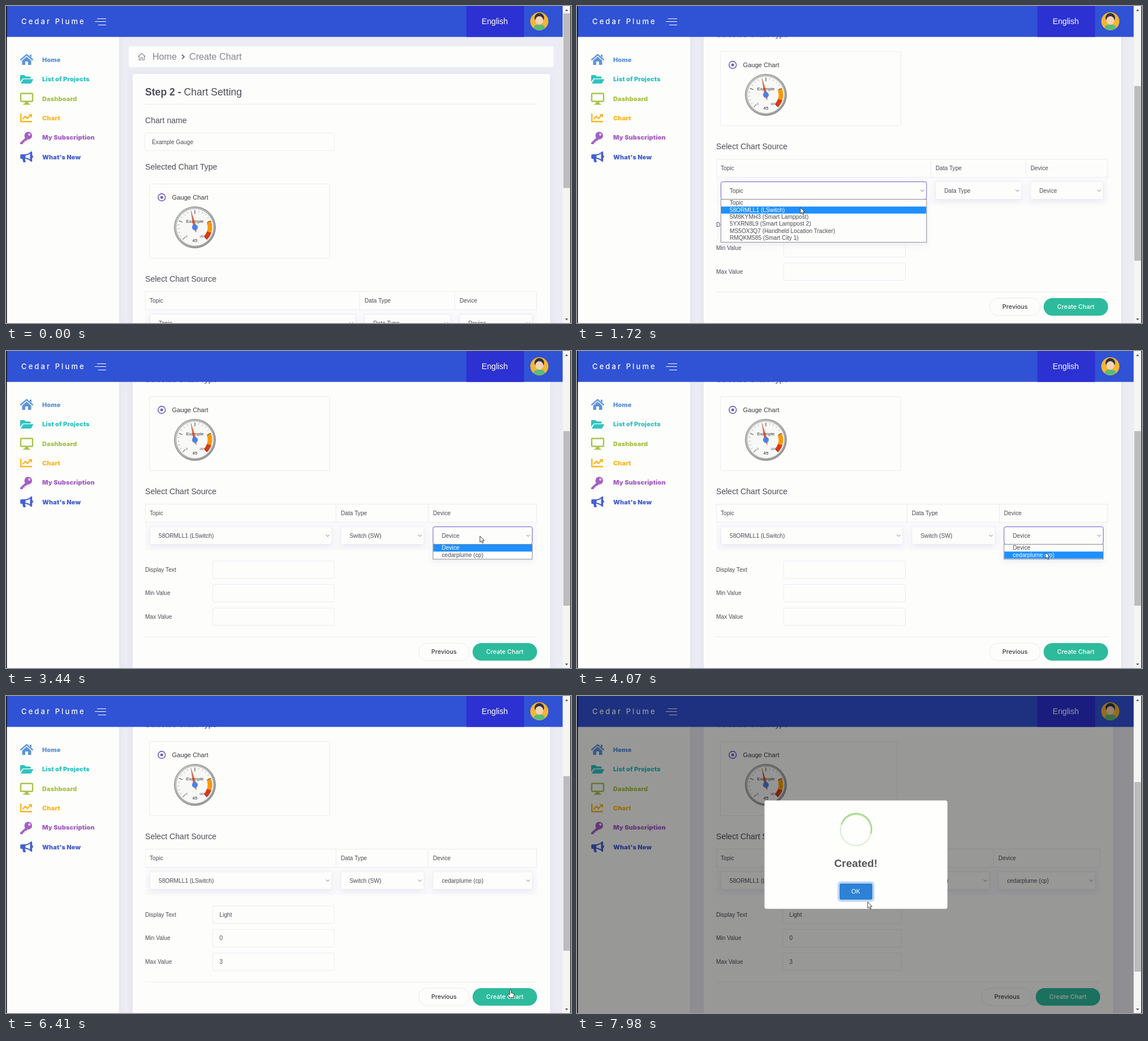
Recreate the animation shown at these times as an HTML page. Size 999 px wide and 560 px high, loop 8 s.

```html
<!DOCTYPE html>
<html lang="en">
<head>
<meta charset="utf-8">
<title>Create Chart</title>
<style>
html, body { margin: 0; width: 100%; height: 100%; overflow: hidden; background: #ececf4; }
svg { display: block; font-family: Arial, "Liberation Sans", sans-serif; }
.ui { font-family: Inter, Roboto, sans-serif; }
</style>
</head>
<body>
<svg id="stage" width="999" height="560" viewBox="0 0 999 560">
  <defs>
    <filter id="soft" x="-20%" y="-60%" width="140%" height="260%">
      <feDropShadow dx="0" dy="4" stdDeviation="5" flood-color="#6a6ac8" flood-opacity=".11"/>
    </filter>
    <filter id="card" x="-10%" y="-10%" width="120%" height="120%">
      <feDropShadow dx="0" dy="0" stdDeviation="6" flood-color="#6a6ac8" flood-opacity=".1"/>
    </filter>
    <linearGradient id="rim" x2="1" y2="1">
      <stop stop-color="#c9c9c9"/><stop offset="1" stop-color="#929292"/>
    </linearGradient>
  </defs>
  <g id="page"></g>
  <g id="frame"></g>
  <g id="top"></g>
</svg>
<script>
const STEP = 156.3, LOOP = 8000;
const INK = '#4d4d57', LINE = '#ebebf5', PAPER = '#fdfdfb', PURPLE = '#6c5fc4', BLUE = '#1e90ff';
const $ = id => document.getElementById(id);
const clamp = v => Math.max(0, Math.min(1, v));
const ease = v => v * v * (3 - 2 * v);

const rect = (x, y, r, b, fill, more = '') =>
  `<rect x="${x}" y="${y}" width="${r - x}" height="${b - y}" fill="${fill}" ${more}/>`;
const box = (x, y, r, b, stroke = LINE, rx = 3, more = '') =>
  rect(x, y, r, b, PAPER, `stroke="${stroke}" rx="${rx}" ${more}`);
const text = (x, y, s, size = 10.2, fill = INK, more = '') =>
  `<text x="${x}" y="${y}" font-size="${size}" fill="${fill}" ${more}>${s}</text>`;
const path = (d, stroke, width = 1, fill = 'none', more = '') =>
  `<path d="${d}" stroke="${stroke}" stroke-width="${width}" fill="${fill}" ${more}/>`;
const disc = (x, y, r, fill, more = '') => `<circle cx="${x}" cy="${y}" r="${r}" fill="${fill}" ${more}/>`;
const polar = (r, deg) => {
  const a = deg * Math.PI / 180;
  return `${(r * Math.cos(a)).toFixed(2)} ${(r * Math.sin(a)).toFixed(2)}`;
};
const MID = 'text-anchor="middle"';

// Cursor stops: step, x, y
const stops = [[5, 640, 230], [8, 430, 325], [9, 428, 328], [11, 395, 356], [13, 397, 357], [15, 690, 327],
  [17, 681, 356], [20, 684, 358], [22, 838, 327], [24, 829, 355], [27, 828, 356], [29, 470, 386],
  [34, 470, 388], [38, 475, 470], [40, 885, 521], [41, 892, 519], [44, 905, 527], [48, 918, 530], [49, 900, 518], [51, 514, 364]];

function cursorAt(k) {
  let i = 1;
  while (i < stops.length - 1 && stops[i][0] < k) i++;
  const [p, q] = [stops[i - 1], stops[i]];
  const f = ease(clamp((k - p[0]) / (q[0] - p[0])));
  return [p[1] + (q[1] - p[1]) * f, p[2] + (q[2] - p[2]) * f];
}

function gauge() {
  const at = v => 135 + 2.7 * v;
  const arc = (from, to, color) =>
    path(`M${polar(26.5, at(from))}A26.5 26.5 0 0 1 ${polar(26.5, at(to))}`, color, 8);
  let s = disc(0, 0, 36.5, 'url(#rim)', 'stroke="#777" stroke-width=".8"') +
    disc(0, 0, 32.5, '#f8f8f7', 'stroke="#ddd"') + arc(75, 90, '#ff9900') + arc(90, 100, '#dc3912');
  for (let v = 0; v <= 100; v += 5) {
    const major = v % 25 === 0;
    s += path(`M${polar(major ? 24 : 27.5, at(v))}L${polar(30.5, at(v))}`, major ? '#333' : '#777', major ? 1 : .6);
  }
  s += text(0, -8, 'Example', 8, '#333', MID) + text(0, 26, '45', 8, '#222', MID) +
    text(-14.5, 18, '0', 4.6, '#444', MID) + text(12, 18, '100', 4.6, '#444', MID);
  s += path(`M${polar(29, at(45))}L${polar(2.6, at(45) + 90)}L${polar(9, at(45) + 180)}L${polar(2.6, at(45) - 90)}Z`,
    '#c63310', .5, '#dc3912', 'opacity=".8"');
  return `<g transform="translate(334 391)">${s}${disc(0, 0, 4.8, '#4684ee', 'stroke="#3a6fd0" stroke-width=".5"')}</g>`;
}

function select(x, r, label, open) {
  return box(x, 544.5, r, 575.5, open ? PURPLE : LINE, 3, open ? '' : 'filter="url(#soft)"') +
    text(x + 15.5, 564, label) + path(`M${r - 10.5} 558.5l3.2 3.2 3.2-3.2`, '#777');
}

function menu(x, r, items, hot) {
  const h = 12.4, y = 575.5;
  return rect(x, y, r, y + items.length * h + 1.5, PAPER, 'stroke="#8c8c94" filter="url(#soft)"') +
    rect(x + .5, y + .4 + hot * h, r - .5, y + .4 + (hot + 1) * h, BLUE) +
    items.map((s, i) => text(x + 15.5, y + 9.7 + i * h, s, 10.2, i === hot ? '#fff' : INK)).join('');
}

function pill(x, r, label, fill, ink, stroke) {
  return rect(x, 750, r, 781, fill, `rx="15.5" stroke="${stroke}"`) +
    text((x + r) / 2, 769.3, label, 10.8, ink, `${MID} class="ui" font-weight="500"`);
}

const topics = ['Topic', '58ORMLL1 (LSwitch)', '5M8KYMH3 (Smart Lamppost)', '5YXRN8L9 (Smart Lamppost 2)',
  'MS5OX3Q7 (Handheld Location Tracker)', 'RMQKM585 (Smart City 1)'];
const types = ['Data Type', 'Switch (SW)'];
const devices = ['Device', 'cedarplume (cp)'];

function page(k, scroll) {
  const done = k >= 49, d = done ? 14 : 0;
  const [a, b] = done ? [577, 737] : k >= 20 ? [584, 747] : k >= 13 ? [618, 798] : [626, 794];
  const edge = 939 - d, inL = done ? 363 : 365, inR = done ? 574 : 580.5;
  let s = box(217, 71, 968 - d, 108, '#f4f4fa', 2) +
    path('M233.5 89.5l6.5-6 6.5 6M235.5 88v7.5h3v-4.5h3v4.5h3V88', '#85858f', 1.1) +
    text(259, 95, 'Home', 16.1, '#85858f') + path('M311 86l4 3.8-4 3.8', '#666670', 1.8) +
    text(324, 95, 'Create Chart', 16.2, '#85858f') +
    rect(224, 120, 962 - d, 830, PAPER, 'filter="url(#card)"') +
    text(246, 158, '<tspan font-weight="bold">Step 2 - </tspan>Chart Setting', 17.6) +
    path(`M246 173.5H${edge}`, LINE) +
    text(246, 207, 'Chart name', 14.1) + box(245.5, 224.5, inR, 255.5) + text(258, 243.7, 'Example Gauge') +
    text(246, 289, 'Selected Chart Type', 14.1) + box(253.5, 314.5, done ? 566 : 572.5, 445.5, LINE, 2) +
    disc(275.3, 338, 6.4, '#fff', `stroke="${PURPLE}" stroke-width="1.6"`) + disc(275.3, 338, 2.5, PURPLE) +
    text(293.5, 341.7, 'Gauge Chart', 11.2, '#3a3a40') + gauge() + text(246, 487, 'Select Chart Source', 14.1);

  s += rect(246, 537, edge, 585, '#fafafb') + box(246.5, 504.5, edge - .5, 536.5, LINE, 0) +
    path(`M${a - .5} 505v32M${b - .5} 505v32`, LINE) +
    text(254, 523.5, 'Topic') + text(a + 8, 523.5, 'Data Type') + text(b + 8, 523.5, 'Device');
  const open = k >= 9 && k < 13 ? 1 : k >= 15 && k < 20 ? 2 : k >= 22 && k < 27 ? 3 : 0;
  s += select(254.5, a - 8, topics[+(k >= 13)], open === 1) +
    select(a + 8, b - 8, types[+(k >= 20)], open === 2) +
    select(b + 8, edge - 8.5, devices[+(k >= 27)], open === 3);

  const fields = [['Display Text', 'Light'.slice(0, Math.max(0, k - 29)), k >= 29 && k < 35],
    ['Min Value', k >= 36 ? '0' : '', k >= 35 && k < 37], ['Max Value', k >= 38 ? '3' : '', k >= 37 && k < 40]];
  fields.forEach(([label, value, focus], i) => {
    const y = 605 + i * 41.5;
    s += text(246, y + 18.7, label) + box(inL + .5, y, inR, y + 31, focus ? PURPLE : LINE) +
      text(inL + 12.5, y + 18.7, value);
  });
  const dark = k >= 44 && !done ? '#269780' : '#2dbb9c';
  s += path(`M246 739H${edge}`, LINE) +
    pill(729.5 - d, 819.5 - d, 'Previous', PAPER, '#3c3c44', LINE) +
    pill(825 - d, 939 - d, 'Create Chart', dark, '#fff', 'none');

  if (open === 1) s += menu(254.5, a - 8, topics, k >= 10 ? 1 : 0);
  if (open === 2) s += menu(a + 8, b - 8, types, k >= 18 ? 1 : 0);
  if (open === 3) s += menu(b + 8, 930.5, devices, k >= 24 ? 1 : 0);
  return `<g transform="translate(0 ${-scroll})">${s}</g>`;
}

function frame() {
  const items = [['Home', '#5f94d9'], ['List of Projects', '#2fc4c0'], ['Dashboard', '#a9c34a'],
    ['Chart', '#fbb71e'], ['My Subscription', '#a45fc4'], ["What's New", '#4460d2']];
  const icons = [
    c => path('M25.5 95.5L36.5 86l11 9.5', c, 2.4) + path('M28.5 96.5l8-7 8 7v7.5h-5.5v-6h-5v6h-5.5zM42 86h3v5l-3-2.5z', 'none', 0, c),
    c => path('M25 134v-10.5q0-1.5 1.5-1.5h6l2.5 2.5h7q1.5 0 1.5 1.5v2H31q-1.5 0-2.3 1.2zM26 137l4-6.8q.6-1 1.8-1h15.5q1.2 0 .6 1.2l-3.2 5.6q-.6 1-1.8 1z', 'none', 0, c),
    c => `<rect x="26" y="154.5" width="21" height="14" rx="1.5" fill="none" stroke="${c}" stroke-width="2.4"/>` +
      path('M34 169h5l1 3.5h2.5v2h-12v-2H33z', 'none', 0, c),
    c => path('M26.3 190v14.2H46', c, 2.4) + path('M29.5 200l4.5-5 4 3.5 6-6', c, 2.4) + path('M39.5 191H46v6.5z', 'none', 0, c),
    c => path('M34 233l-9 8.5v2.5h5v-2.7h2.7v-2.7h2.7l3-3z', 'none', 0, c) + disc(39.3, 229, 6.8, c) + disc(41.3, 227, 1.9, PAPER),
    c => path('M43.5 259q-5 4-10 4H28q-1.5 0-1.5 1.5v3q0 1.5 1.5 1.5h5.5q5 0 10 4z', c, 2) +
      path('M25.5 262.5h9v7h-9zM29 270h4.5l1.5 6h-4.5zM44 257h2.2v18H44zM46 263.5q2 .5 2 2.5t-2 2.5z', 'none', 0, c)];
  let s = rect(0, 54, 200, 560, PAPER, 'filter="url(#card)"') + rect(0, 0, 984.5, 54.6, '#3052d4') +
    rect(814, 0, 916, 54.6, '#2c31d2') +
    text(27, 32, 'Cedar Plume', 13, '#fff', 'class="ui" font-weight="500" letter-spacing="3.1"') +
    path('M161 22.5h16M157 27.5h20M163 33.5h14', '#fff', 1.1) + text(864.2, 32, 'English', 14.1, '#fff', MID);
  items.forEach(([label, c], i) => {
    s += icons[i](c) + text(64, 99 + i * 34.3, label, 11, c, 'class="ui" font-weight="900" letter-spacing=".1"');
  });
  s += disc(943, 27, 16, '#f3b632') + path('M933 39.5q0-7 10-7t10 7q-10 6.5-20 0z', 'none', 0, '#5dbb78') +
    disc(943, 21, 8.5, '#33333c') + '<ellipse cx="943" cy="25.5" rx="7" ry="7.5" fill="#f7d3b5"/>';
  return s + rect(0, 0, 1.5, 560, '#08080c');
}

function scrollbar(k, scroll) {
  const y = k >= 49 ? 152 : 13 + scroll * 128.5 / 234, h = k >= 49 ? 335 : 308.5;
  return rect(984.5, 0, 998, 560, '#f5f5f4') + rect(985.5, y, 997, y + h, '#bcbcbc') +
    path('M988.5 9l2.7-3.5 2.7 3.5zM988.5 552l2.7 3.5 2.7-3.5z', 'none', 0, '#606064') +
    rect(997.7, 0, 999, 560, '#1a1a1e');
}

function dialog(k) {
  const size = [.82, 1.04, 1][k - 49];
  const turn = k === 51 ? path('M-25.5 -10A27.2 27.2 0 0 1 26.6 6', '#a0d98a', 2.4) : '';
  const s = rect(331.5, 184.5, 655, 376, '#fefefd', 'rx="4"') +
    `<g transform="translate(493 237)">${disc(0, 0, 27.2, 'none', 'stroke="#deefd4" stroke-width="2.4"')}${turn}</g>` +
    text(493, 302, 'Created!', 18.9, '#55555a', `${MID} font-weight="bold"`) +
    rect(462, 329, 524.5, 362, '#fff', 'rx="4" stroke="#a5c6ea" stroke-width="1.8"') +
    rect(464, 331, 522.5, 360, '#2d82d6', 'rx="3"') + text(493, 349.3, 'OK', 11, '#fff', MID);
  return rect(0, 0, 984.5, 560, '#000', 'opacity=".4"') +
    `<g transform="translate(493 280) scale(${size}) translate(-493 -280)">${s}</g>`;
}

function pointer(k) {
  if (k < 5) return '';
  const [x, y] = cursorAt(k), hand = k >= 40 && k < 49;
  const d = hand
    ? 'M-1.3 .8Q0-.8 1.3.8V5.5L5 6.3Q6.5 6.7 6.3 8.5L5.3 13.8H-1.5L-4.8 8.8Q-5 7-3.2 7.5L-1.3 9Z'
    : 'M0 0V10.8L2.5 8.5L4.2 12.4L6 11.6L4.4 7.9H7.8Z';
  return path(d, '#26262c', .9, '#fff', `transform="translate(${x} ${y})"`);
}

let shown = -1;
function draw(now) {
  const k = Math.floor(now % LOOP / STEP);
  if (k !== shown) {
    shown = k;
    const scroll = 234 * ease(clamp((k - 1) / 5));
    $('page').innerHTML = page(k, scroll);
    $('top').innerHTML = (k >= 49 ? dialog(k) : '') + scrollbar(k, scroll) + pointer(k);
  }
  requestAnimationFrame(draw);
}
$('frame').innerHTML = frame();
draw(performance.now());
</script>
</body>
</html>
```
